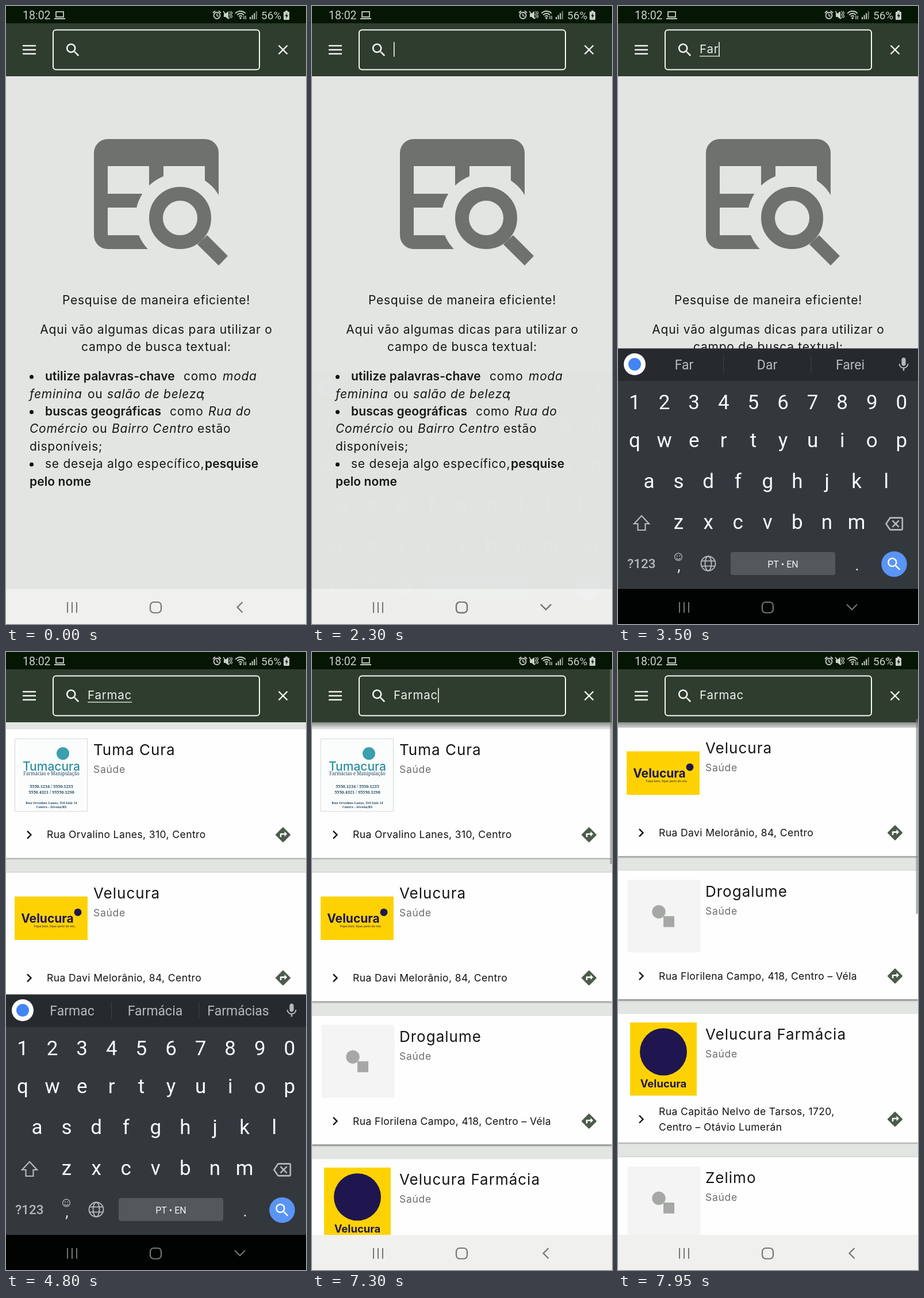
An HTML page with a canvas for the animation above (8 s loop, 522 by 1073 pixels).

```html
<!DOCTYPE html>
<html lang="pt">
<head>
<meta charset="utf-8">
<title>Busca</title>
<style>
html, body { margin: 0; width: 522px; height: 1073px; overflow: hidden; background: #e3e5e3; }
canvas { display: block; }
</style>
</head>
<body>
<canvas id="stage" width="522" height="1073"></canvas>
<script>
const W = 522, H = 1073, LOOP = 8000;
const screen = document.getElementById('stage').getContext('2d');
const layer = document.createElement('canvas');
layer.width = W;
layer.height = H;
const panel = layer.getContext('2d');
let c = screen;

const SANS = 'Inter, sans-serif', ROBOTO = 'Roboto, sans-serif';
const PAGE = '#e3e5e3', NAV = '#f0f1ef', GREY = '#6f716e';
const ICONS = {
  search: 'M15.5 14h-.79l-.28-.27C15.41 12.59 16 11.11 16 9.5 16 5.91 13.09 3 9.5 3S3 5.91 3 9.5 5.91 16 9.5 16c1.61 0 3.09-.59 4.23-1.57l.27.28v.79l5 4.99L20.49 19l-4.99-5zm-6 0C7.01 14 5 11.99 5 9.5S7.01 5 9.5 5 14 7.01 14 9.5 11.99 14 9.5 14z',
  route: 'M21.71 11.29l-9-9c-.39-.39-1.02-.39-1.41 0l-9 9c-.39.39-.39 1.02 0 1.41l9 9c.39.39 1.02.39 1.41 0l9-9c.39-.38.39-1.01 0-1.41zM14 14.5V12h-4v3H8v-4c0-.55.45-1 1-1h5V7.5l3.5 3.5-3.5 3.5z',
  erase: 'M22 3H7c-.69 0-1.23.35-1.59.88L0 12l5.41 8.11c.36.53.9.89 1.59.89h15c1.1 0 2-.9 2-2V5c0-1.1-.9-2-2-2zm0 16H7.07L2.4 12l4.66-7H22v14zm-11.59-2L14 13.41 17.59 17 19 15.59 15.41 12 19 8.41 17.59 7 14 10.59 10.41 7 9 8.41 12.59 12 9 15.59z',
  mic: 'M12 14c1.66 0 3-1.34 3-3V5c0-1.66-1.34-3-3-3S9 3.34 9 5v6c0 1.66 1.34 3 3 3zm5.3-3c0 3-2.54 5.1-5.3 5.1S6.7 14 6.7 11H5c0 3.41 2.72 6.23 6 6.72V21h2v-3.28c3.28-.48 6-3.3 6-6.72h-1.7z'
};
for (const k in ICONS) ICONS[k] = new Path2D(ICONS[k]);

const clamp = v => Math.max(0, Math.min(1, v));
const span = (t, a, b) => clamp((t - a) / (b - a));

function rect(x, y, w, h, color, r = 0) {
  c.fillStyle = color;
  c.beginPath();
  c.roundRect(x, y, w, h, r);
  c.fill();
}
function dot(x, y, r, color) {
  c.fillStyle = color;
  c.beginPath();
  c.arc(x, y, r, 0, 7);
  c.fill();
}
function ring(x, y, r, color, w, a = 0, b = Math.PI * 2) {
  c.strokeStyle = color;
  c.lineWidth = w;
  c.beginPath();
  c.arc(x, y, r, a, b);
  c.stroke();
}
function path(pts, color, w) {
  c.beginPath();
  for (let i = 0; i < pts.length; i += 2) c.lineTo(pts[i], pts[i + 1]);
  if (w) {
    c.strokeStyle = color;
    c.lineWidth = w;
    c.stroke();
  } else {
    c.fillStyle = color;
    c.fill();
  }
}
function icon(name, x, y, s, color) {
  c.save();
  c.translate(x - 12 * s, y - 12 * s);
  c.scale(s, s);
  c.fillStyle = color;
  c.fill(ICONS[name]);
  c.restore();
}
function text(s, x, y, font, color, gap = 0, align = 'left') {
  c.font = font;
  c.fillStyle = color;
  c.textAlign = align;
  c.letterSpacing = gap + 'px';
  c.fillText(s, x, y);
}

function statusBar() {
  const ink = '#c9cfc9';
  rect(0, 0, W, 30, '#051604');
  text('18:02', 29, 23, '19.5px ' + ROBOTO, ink);
  c.strokeStyle = ink;
  c.lineWidth = 1.8;
  c.strokeRect(87, 10, 13, 9);
  path([84, 22, 103, 22], ink, 2);
  ring(367, 16.5, 5.5, ink, 1.8);
  path([367, 13, 367, 17, 370, 18], ink, 1.5);
  path([360, 12, 364, 8.5], ink, 2);
  path([370, 8.5, 374, 12], ink, 2);
  path([379, 13, 382, 13, 387, 9, 387, 23, 382, 19, 379, 19], ink);
  path([378, 9, 388, 22], ink, 1.5);
  for (const x of [389, 392]) path([x, 9, x + 1.5, 12, x, 15, x + 1.5, 18, x, 21], ink, 1.3);
  for (const r of [4, 8, 12]) ring(408, 21, r, ink, 1.8, -2.4, -0.74);
  dot(408, 21, 1.8, ink);
  path([414, 17, 414, 23], ink, 1.4);
  path([417, 17, 417, 23], ink, 1.4);
  for (let i = 0; i < 4; i++) rect(424 + i * 3.6, 19 - i * 3.3, 2, 4 + i * 3.3, i < 3 ? ink : '#7d857d');
  text('56%', 444, 23, '19px ' + ROBOTO, ink);
  rect(483, 10, 10, 14, ink, 1);
  rect(486, 8, 4, 3, ink);
  path([489, 12, 485.5, 17.5, 488, 17.5, 487, 22, 491, 16, 488.5, 16], '#051604');
}

function header(typed, caret, underline, scrolled) {
  if (scrolled) {
    const g = c.createLinearGradient(0, 122, 0, 133);
    g.addColorStop(0, 'rgba(0,0,0,.4)');
    g.addColorStop(1, 'rgba(0,0,0,0)');
    c.fillStyle = g;
    c.fillRect(0, 122, W, 11);
  }
  rect(0, 30, W, 92, '#2f3d2f');
  const ink = '#f6f8f5';
  for (const y of [69, 76, 83]) path([29, y, 52, y], ink, 2.4);
  c.strokeStyle = ink;
  c.lineWidth = 2;
  c.beginPath();
  c.roundRect(82, 41.5, 359, 69, 5);
  c.stroke();
  icon('search', 116.4, 76.4, 1.27, ink);
  path([474.5, 68.5, 489.5, 83.5], ink, 2.4);
  path([489.5, 68.5, 474.5, 83.5], ink, 2.4);
  text(typed, 142, 82, '20.5px ' + SANS, '#eef1ed', 0.8);
  const end = 142 + (typed ? c.measureText(typed).width : 0);
  if (underline && typed) rect(142, 86.5, end - 142, 1.3, ink);
  if (caret) rect(end, 62.5, 1.6, 25.5, ink);
}

function tableIcon() {
  rect(153, 231, 217, 191, GREY, 24);
  rect(177, 278, 72, 48, PAGE);
  rect(274, 278, 72, 48, PAGE);
  rect(177, 350, 72, 48, PAGE);
  dot(303, 368, 78, PAGE);
  ring(303, 368, 42, GREY, 24);
  path([350, 398, 386, 434, 370, 450.5, 333, 414], GREY);
}

const TIPS = [
  [650, 'b', 68, 'utilize palavras-chave', '', 309, 'como', 'i', 377, 'moda'],
  [681, 'i', 41, 'feminina', '', 142, 'ou', 'i', 176, 'salão de beleza', '', 340, ';'],
  [711, 'b', 68, 'buscas geográficas', '', 285, 'como', 'i', 352, 'Rua do'],
  [741, 'i', 41, 'Comércio', '', 150, 'ou', 'i', 184, 'Bairro Centro', '', 333, 'estão'],
  [772, '', 41, 'disponíveis;'],
  [802, '', 68, 'se deseja algo específico,', 'b', 346, 'pesquise'],
  [833, 'b', 41, 'pelo nome']
];
function tips() {
  const font = '21px ' + SANS, ink = '#151715';
  const looks = { '': [font, 0.75], b: ['600 ' + font, 0.1], i: ['italic ' + font, 0.75] };
  tableIcon();
  text('Pesquise de maneira eficiente!', 261.5, 518, font, ink, 0.75, 'center');
  text('Aqui vão algumas dicas para utilizar o', 261.5, 569, font, ink, 0.75, 'center');
  text('campo de busca textual:', 261.5, 599, font, ink, 0.75, 'center');
  for (const [y, ...runs] of TIPS) {
    for (let i = 0; i < runs.length; i += 3) {
      const [f, gap] = looks[runs[i]];
      text(runs[i + 2], runs[i + 1], y, f, ink, gap);
    }
  }
  for (const y of [644, 705, 796]) dot(44.5, y, 3.5, '#0c0d0c');
}

const NAVY = '#1f1650', YELLOW = '#fed202';
function leafletTile(y) {
  rect(15, y + 16, 127, 127, '#d5d8d8');
  rect(16, y + 17, 125, 125, '#fbfdfc');
  dot(99, y + 42, 11, '#3a9fae');
  text('Tumacura', 79, y + 72, '500 21px ' + SANS, '#2a8fa5', 0, 'center');
  const serif = (s, dy, size, w) => text(s, 79, y + dy, `${w} ${size}px "Noto Serif", serif`, '#23475f', 0, 'center');
  serif('Farmácias e Manipulação', 80, 8, 400);
  serif('5550.1234 / 5550.1235', 102, 7.3, 700);
  serif('5550.4321 / 95550.1298', 111.5, 7.3, 700);
  serif('Rua Orvalino Lanes, 310 Sala 14', 130, 5.6, 600);
  serif('Centro - Alvena/RS', 137, 5.6, 600);
}
function wideTile(y) {
  rect(15, y + 41.5, 127, 75.5, YELLOW);
  text('Velucura', 72, y + 87, '700 21px ' + SANS, NAVY, 0, 'center');
  dot(125, y + 69, 6.5, NAVY);
  text('Fique bem, fique perto de nós.', 121, y + 95, '5px ' + SANS, NAVY, 0, 'right');
}
function emptyTile(y) {
  rect(16.5, y + 16, 127, 126, '#f3f4f3');
  dot(71, y + 71.5, 11.7, '#a6a8a6');
  rect(79, y + 79, 19, 19, '#a6a8a6');
}
function tallTile(y) {
  rect(21, y + 15, 116, 127, YELLOW);
  dot(79, y + 66, 41, NAVY);
  text('Velucura', 79, y + 128, '700 18.5px ' + SANS, NAVY, 0, 'center');
}

const CARDS = [
  ['Tuma Cura', leafletTile, 'Rua Orvalino Lanes, 310, Centro'],
  ['Velucura', wideTile, 'Rua Davi Melorânio, 84, Centro'],
  ['Drogalume', emptyTile, 'Rua Florilena Campo, 418, Centro – Véla'],
  ['Velucura Farmácia', tallTile, 'Rua Capitão Nelvo de Tarsos, 1720,', 'Centro – Otávio Lumerán'],
  ['Zelimo', emptyTile, 'Rua Davi Melorânio, 212, Centro']
];
function results(scroll) {
  CARDS.forEach(([name, tile, ...address], i) => {
    const y = 134.3 + 248.65 * i - scroll;
    c.save();
    c.shadowColor = 'rgba(0,0,0,.5)';
    c.shadowBlur = 3;
    c.shadowOffsetY = 1.5;
    rect(0, y, W, 223.5, '#fdfefd');
    c.restore();
    tile(y);
    text(name, 152, y + 45, '26px ' + SANS, '#141514', 1);
    text('Saúde', 152, y + 76, '17.5px ' + SANS, '#6c6e6c', 0.7);
    path([37, y + 176.5, 43.5, y + 183, 37, y + 189.5], '#111', 2.4);
    address.forEach((s, n) =>
      text(s, 71, y + 189 + (address.length - 1) * -13.3 + n * 26.6, '17.5px ' + SANS, '#111211', 0.4));
    icon('route', 482, y + 183, 1.3, '#4c5b4c');
  });
}

function navIcons(down) {
  const ink = '#747674';
  for (const x of [107, 115, 123]) path([x, 1035, x, 1053.5], ink, 2);
  c.strokeStyle = ink;
  c.lineWidth = 2.2;
  c.beginPath();
  c.roundRect(251, 1035, 19, 18.5, 6);
  c.stroke();
  path(down ? [398, 1039, 407, 1048, 416, 1039] : [411.5, 1035, 402.5, 1044, 411.5, 1053], ink, 2.2);
}

const HINTS = {
  F: ['F', 'Foi', 'Faz'],
  Fa: ['Fa', 'Faz', 'Fala'],
  Far: ['Far', 'Dar', 'Farei'],
  Farm: ['Farm', 'Farmácia', 'Farma'],
  Farma: ['Farma', 'Farmácia', 'Farmar'],
  Farmac: ['Farmac', 'Farmácia', 'Farmácias']
};
const ROWS = [['1234567890', 29, 700], ['qwertyuiop', 29, 766], ['asdfghjkl', 54, 837], ['zxcvbnm', 105.5, 908]];
function keyboard(hints) {
  const soft = '#b6babd';
  rect(0, 594.5, W, 57, '#262a2e');
  rect(0, 651, W, 361, '#33383d');
  rect(0, 1012, W, 61, '#010202');
  dot(29, 622, 19, '#fff');
  dot(29, 622, 11, '#4285f4');
  icon('mic', 497, 622.5, 1.2, soft);
  if (hints) {
    for (const x of [183, 335.5]) rect(x, 607, 1.2, 30, '#3b4045');
    hints.forEach((s, i) => text(s, 115 + 144.5 * i, 631, '23px ' + ROBOTO, soft, 0, 'center'));
  }
  for (const [keys, x, y] of ROWS)
    [...keys].forEach((k, i) => text(k, x + 51.6 * i, y, '35px ' + ROBOTO, '#fafbfb', 0, 'center'));
  c.lineJoin = 'miter';
  path([41, 885, 54, 899, 47.5, 899, 47.5, 910, 34.5, 910, 34.5, 899, 28, 899, 41, 885, 54, 899], soft, 2.2);
  icon('erase', 480.5, 899, 1.3, soft);
  text('?123', 41, 976, '500 22.5px ' + ROBOTO, soft, 0, 'center');
  ring(105, 956.5, 6.3, soft, 1.3);
  ring(105, 957.5, 3.2, soft, 1.2, 0.2, 2.94);
  dot(102.8, 954.8, 1, soft);
  dot(107.2, 954.8, 1, soft);
  text(',', 106, 981, '27px ' + ROBOTO, '#e4e6e7', 0, 'center');
  ring(157, 968, 12.5, soft, 1.9);
  c.beginPath();
  c.ellipse(157, 968, 5.5, 12.5, 0, 0, 7);
  c.stroke();
  for (const y of [963.5, 972.5]) path([145, y, 169, y], soft, 1.8);
  rect(196, 948, 182, 40, '#53585c', 4);
  text('PT • EN', 287, 974.5, '16px ' + ROBOTO, '#f2f3f3', 0, 'center');
  text('.', 416, 980, '27px ' + ROBOTO, '#e4e6e7', 0, 'center');
  dot(480.5, 969, 22.3, '#5a94f5');
  icon('search', 480.5, 969, 1.25, '#fff');
}

// [time, text]
const TYPING = [[3200, 'F'], [3350, 'Fa'], [3450, 'Far'], [3800, 'Farm'], [4050, 'Farma'], [4300, 'Farmac']];
const CARET = [[2300, 2800], [3200, 4800], [5300, 5850], [6300, 6800], [7300, 7800]];

function draw(t) {
  const typed = TYPING.reduce((s, [at, str]) => t >= at ? str : s, '');
  const caret = CARET.some(([a, b]) => t >= a && t < b);
  const enter = span(t, 2300, 2550), leave = span(t, 6050, 6200);
  const alpha = Math.min(1 - (1 - enter) ** 2, 1 - leave ** 2.6);
  const slide = 42 * (1 - enter) ** 3 + 48 * leave;
  const drag = span(t, 7300, 7950);
  const scroll = 252 * drag * drag * (3 - 2 * drag);
  const down = t >= 2300 && t < 6050;

  c = screen;
  rect(0, 0, W, H, PAGE);
  if (t < 4400) tips();
  else results(scroll);
  header(typed, caret, t < 6050, scroll > 0);
  statusBar();
  rect(0, 1012, W, 61, NAV);
  navIcons(down);
  if (scroll > 0) rect(518.5, 30 + scroll * 0.344, 3.5, 338, 'rgba(125,128,125,.6)');

  if (alpha > 0) {
    c = panel;
    c.clearRect(0, 0, W, H);
    keyboard(leave > 0 ? null : HINTS[typed]);
    c = screen;
    c.globalAlpha = alpha;
    c.drawImage(layer, 0, slide);
    c.globalAlpha = 1;
    if (down) navIcons(true);
  }

  const press = span(t, 5850, 6050), fade = 1 - span(t, 6150, 6500);
  if (press > 0 && fade > 0) {
    const w = 60 + 95 * press;
    rect(407.5 - w / 2, 1012, w, 61, `rgba(150,152,150,${0.35 * press * fade})`, 30.5);
  }
}

const start = performance.now();
function tick() {
  draw((performance.now() - start) % LOOP);
  requestAnimationFrame(tick);
}
tick();
</script>
</body>
</html>
```
